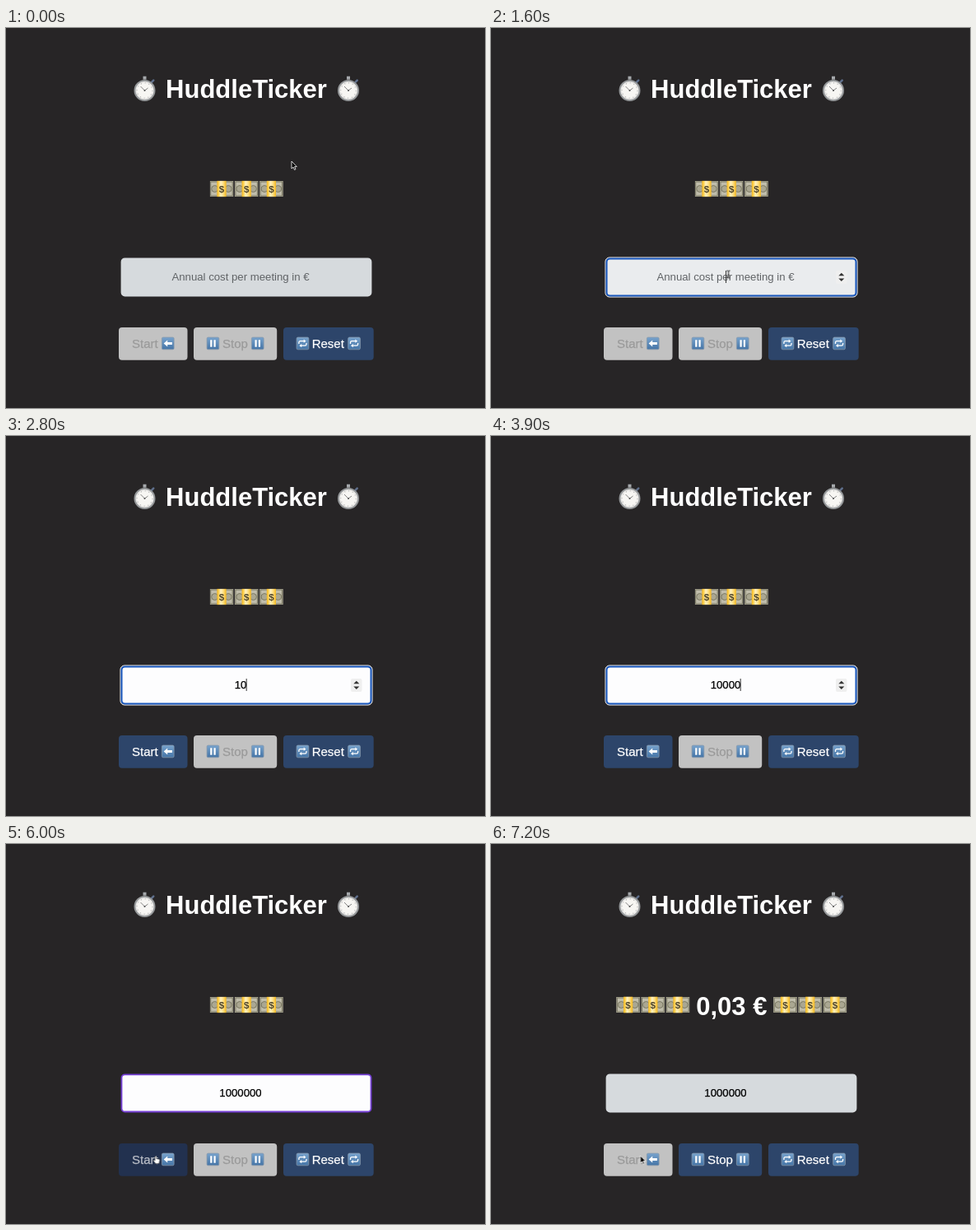
An HTML page for the animation above (8000 ms loop, 582x462 px).

```html
<!DOCTYPE html>
<html lang="en">
<head>
<meta charset="utf-8">
<title>HuddleTicker</title>
<style>
html, body { margin: 0; width: 100%; height: 100%; overflow: hidden; background: #272526; }
body { position: relative; font-family: "Liberation Sans", Arial, sans-serif; }
svg { position: absolute; left: 0; top: 0; display: block; }
.big { font-size: 31px; font-weight: bold; fill: #fff; text-anchor: middle; }
.label { font-size: 15px; color: #fff; fill: currentColor; stroke: currentColor; stroke-width: .25px; }
.hint { font-size: 13.2px; fill: #606366; text-anchor: middle; }
.button { fill: #2d456a; }

/* One 8 s clock: 1.25% is 100 ms. Everything holds between keys. */
.anim { animation: 8s step-end infinite; }

#field { animation-name: field; }
@keyframes field {
  0% { fill: #d6dadd; stroke: #d6dadd; }
  13.75% { fill: #d6dadd; stroke: #b9bdc1; }
  18.75% { fill: #d6dadd; stroke: #b9bdc1; animation-timing-function: steps(2); }
  21.25% { fill: #fdfdfe; stroke: #fdfdfe; }
  75% { fill: #fdfdfe; stroke: #7640d6; }
  76.25% { fill: #fdfdfe; stroke: #7640d6; animation-timing-function: steps(5); }
  82.5%, 100% { fill: #d6dadd; stroke: #d6dadd; }
}
#ring { animation-name: ring; }
@keyframes ring { 0%, 75%, 100% { opacity: 0; } 20% { opacity: 1; } }
#spinner { animation-name: spinner; }
@keyframes spinner { 0%, 75%, 100% { opacity: 0; } 13.75% { opacity: 1; } }
#hint { animation-name: hint; }
@keyframes hint { 0% { opacity: 1; } 23.75%, 100% { opacity: 0; } }

#start { animation-name: start; }
@keyframes start {
  0% { fill: #c2c2c2; }
  25% { fill: #c2c2c2; animation-timing-function: steps(5); }
  31.25% { fill: #2d456a; }
  67.5% { fill: #22314f; }
  76.25% { fill: #22314f; animation-timing-function: steps(5); }
  82.5%, 100% { fill: #c2c2c2; }
}
#startText { animation-name: startText; }
@keyframes startText {
  0% { color: #9a9a9a; }
  25% { color: #9a9a9a; animation-timing-function: steps(5); }
  31.25% { color: #fff; }
  75% { color: #b9bdc6; }
  76.25% { color: #b9bdc6; animation-timing-function: steps(5); }
  82.5%, 100% { color: #9a9a9a; }
}
#stop { animation-name: stop; }
@keyframes stop {
  0% { fill: #c2c2c2; }
  76.25% { fill: #c2c2c2; animation-timing-function: steps(5); }
  82.5%, 100% { fill: #2d456a; }
}
#stopText { animation-name: stopText; }
@keyframes stopText {
  0% { color: #9a9a9a; }
  76.25% { color: #9a9a9a; animation-timing-function: steps(5); }
  82.5%, 100% { color: #fff; }
}

#idle { animation-name: idle; }
@keyframes idle { 0% { opacity: 1; } 77.5%, 100% { opacity: 0; } }
#running { animation-name: running; }
@keyframes running { 0% { opacity: 0; } 77.5%, 100% { opacity: 1; } }
#zero { animation-name: zero; }
@keyframes zero { 0% { opacity: 1; } 90%, 100% { opacity: 0; } }
#three { animation-name: three; }
@keyframes three { 0% { opacity: 0; } 90%, 100% { opacity: 1; } }

#typed {
  position: absolute; left: 285px; top: 294.5px; height: 16px;
  font-size: 13.2px; line-height: 16px; color: #000; -webkit-text-stroke: .25px #000;
  transform: translateX(-50%); animation-name: typed;
}
#typed span { display: block; overflow: hidden; }
@keyframes typed {
  0% { width: 0; }
  23.75% { width: 1ch; }
  35% { width: 2ch; }
  38.75% { width: 3ch; }
  42.5% { width: 4ch; }
  48.75% { width: 5ch; }
  52.5% { width: 6ch; }
  56.25%, 100% { width: 7ch; }
}
#caret {
  position: absolute; right: -.5px; top: .5px; width: 1px; height: 15px;
  background: #333; animation-name: caret;
}
@keyframes caret {
  0%, 30%, 62.5%, 75%, 100% { opacity: 0; }
  20%, 35%, 68.75% { opacity: 1; }
}

#pointer { animation-name: move; }
@keyframes move {
  0% { transform: translate(347px, 162px); opacity: 1; }
  2.5% { transform: translate(347px, 162px); opacity: 1; animation-timing-function: steps(4); }
  7.5% { transform: translate(322px, 201px); opacity: 1; animation-timing-function: steps(3); }
  11.25% { transform: translate(290px, 256px); opacity: 1; animation-timing-function: steps(3); }
  15% { transform: translate(288.5px, 299.5px); opacity: 1; }
  23.75% { transform: translate(288.5px, 299.5px); opacity: 0; }
  62.5% { transform: translate(280px, 318px); opacity: 1; animation-timing-function: steps(5); }
  68.75%, 100% { transform: translate(181.5px, 379px); opacity: 1; }
}
#arrow { animation-name: arrow; }
@keyframes arrow {
  0%, 63.75%, 77.5%, 100% { opacity: 1; }
  13.75%, 67.5% { opacity: 0; }
}
#beam { animation-name: beam; }
@keyframes beam { 0%, 63.75%, 100% { opacity: 0; } 13.75% { opacity: 1; } }
#hand { animation-name: hand; }
@keyframes hand { 0%, 77.5%, 100% { opacity: 0; } 67.5% { opacity: 1; } }
</style>
</head>
<body>
<svg width="582" height="462" viewBox="0 0 582 462">
  <defs>
    <linearGradient id="band">
      <stop offset="0" stop-color="#f3b61d"/>
      <stop offset=".22" stop-color="#ffd75e"/>
      <stop offset=".4" stop-color="#fff1c4"/>
      <stop offset=".65" stop-color="#ffe28a"/>
      <stop offset="1" stop-color="#f3b61d"/>
    </linearGradient>
    <linearGradient id="tile" x2="0" y2="1">
      <stop offset="0" stop-color="#78a3cd"/>
      <stop offset="1" stop-color="#4474a6"/>
    </linearGradient>
    <g id="watch">
      <path d="M-2-16.300h4v4h-4z" fill="#a5a8ab"/>
      <path d="M8.700-9.300l2-2" stroke="#5f6f8c" stroke-width="2.600" stroke-linecap="round"/>
      <circle r="12" cy="1" fill="#ecebe9" stroke="#96999b" stroke-width="2"/>
      <circle r="9.300" cy="1" fill="#f7f6f3" stroke="#aaa" stroke-width="1.500" stroke-dasharray=".7 4.170"/>
      <path d="M-5-4L0 1L4-2" fill="none" stroke="#777" stroke-width=".9"/>
      <circle r="1" cy="1" fill="#555"/>
    </g>
    <g id="note">
      <rect y=".5" width="28.500" height="19" fill="#c0bdab"/>
      <rect x="1" y="1.500" width="26.500" height="17" fill="none" stroke="#77755f"/>
      <circle cx="6" cy="10" r="4" fill="#aaa792" stroke="#7c7a64"/>
      <circle cx="22.500" cy="10" r="4" fill="#aaa792" stroke="#7c7a64"/>
      <rect x="8.700" y=".2" width="11.200" height="19.600" fill="url(#band)"/>
      <text x="14.250" y="14" font-size="11.500" font-weight="bold" text-anchor="middle" fill="#4d4327">$</text>
    </g>
    <g id="notes">
      <use href="#note"/><use href="#note" x="30.200"/><use href="#note" x="60.400"/>
    </g>
    <rect id="tileBox" x=".4" y=".4" width="14.700" height="14.700" rx="1.500" fill="url(#tile)" stroke="#8799ab" stroke-width=".8"/>
    <g id="back">
      <use href="#tileBox"/>
      <path d="M2.600 7.750L7.200 3.700v2.500h5.700v3.100H7.200v2.500z" fill="#fff"/>
    </g>
    <g id="pause">
      <use href="#tileBox"/>
      <path d="M4.500 3.500h2.200v8.500H4.500zM8.800 3.500H11v8.500H8.800z" fill="#fff"/>
    </g>
    <g id="repeat">
      <use href="#tileBox"/>
      <path d="M3.200 8.300V6.700q0-1.700 1.700-1.700h4.400M12.300 7.200v1.600q0 1.700-1.700 1.700H6.200" fill="none" stroke="#fff" stroke-width="1.300"/>
      <path d="M9 2.900L11.800 5 9 7.100zM6.500 8.400L3.700 10.500l2.800 2.100z" fill="#fff"/>
    </g>
  </defs>

  <use href="#watch" x="168.500" y="75"/>
  <text class="big" x="292" y="85">HuddleTicker</text>
  <use href="#watch" x="416" y="75"/>

  <use id="idle" class="anim" href="#notes" x="247.700" y="185.500"/>
  <g id="running" class="anim">
    <use href="#notes" x="152.300" y="185.500"/>
    <text id="zero" class="big anim" x="292.300" y="207.500">0,00 €</text>
    <text id="three" class="big anim" x="292.300" y="207.500">0,03 €</text>
    <use href="#notes" x="343.200" y="185.500"/>
  </g>

  <rect id="field" class="anim" x="140.500" y="280.300" width="303" height="45.200" rx="4" stroke-width="1.800"/>
  <g id="ring" class="anim" fill="none">
    <rect x="139" y="279" width="306" height="48" rx="5" stroke="#fff"/>
    <rect x="140.500" y="280.500" width="303" height="45" rx="4" stroke="#1857bd" stroke-width="2"/>
  </g>
  <text id="hint" class="hint anim" x="285" y="307">Annual cost per meeting in €</text>
  <g id="spinner" class="anim">
    <rect x="419" y="295" width="13.500" height="16" rx="2" fill="#efefef"/>
    <path d="M422.300 301.300l3.500-3.600 3.500 3.600zM422.300 304.500l3.500 3.600 3.500-3.600z" fill="#333"/>
  </g>

  <rect id="start" class="anim" x="137" y="364" width="83.500" height="39.700" rx="4"/>
  <text id="startText" class="label anim" x="153" y="389">Start</text>
  <use href="#back" x="189" y="375.700"/>

  <rect id="stop" class="anim" x="228" y="364" width="101.200" height="39.700" rx="4"/>
  <use href="#pause" x="243.700" y="375.700"/>
  <text id="stopText" class="label anim" x="263" y="389">Stop</text>
  <use href="#pause" x="298" y="375.700"/>

  <rect class="button" x="337" y="364" width="109.700" height="39.700" rx="4"/>
  <use href="#repeat" x="352.700" y="375.700"/>
  <text class="label" x="371.700" y="389">Reset</text>
  <use href="#repeat" x="415.300" y="375.700"/>
</svg>

<div id="typed" class="anim"><span>1000000</span><i id="caret" class="anim"></i></div>

<svg width="582" height="462" viewBox="0 0 582 462">
  <g id="pointer" class="anim">
    <path id="arrow" class="anim" d="M0 0v9l2.100-1.900 1.400 3.300 1.500-.7-1.400-3.100h2.700z" fill="#000" stroke="#fff" stroke-width=".8"/>
    <path id="beam" class="anim" d="M-2-4.500q2 0 2 1.200 0-1.200 2-1.200M0-3.300v6.600M-2 4.500q2 0 2-1.200 0 1.200 2 1.200M-1 .8h2" fill="none" stroke="#222" stroke-width="1"/>
    <path id="hand" class="anim" d="M-.5 1q.8-1.200 1.700 0v2.500l3.300.7q.9.400.8 1.400L4.500 9.500H.3L-2.500 6q.2-1.300 1.300-.7l.7.700z" fill="#fff" stroke="#222" stroke-width=".5"/>
  </g>
</svg>
</body>
</html>
```
